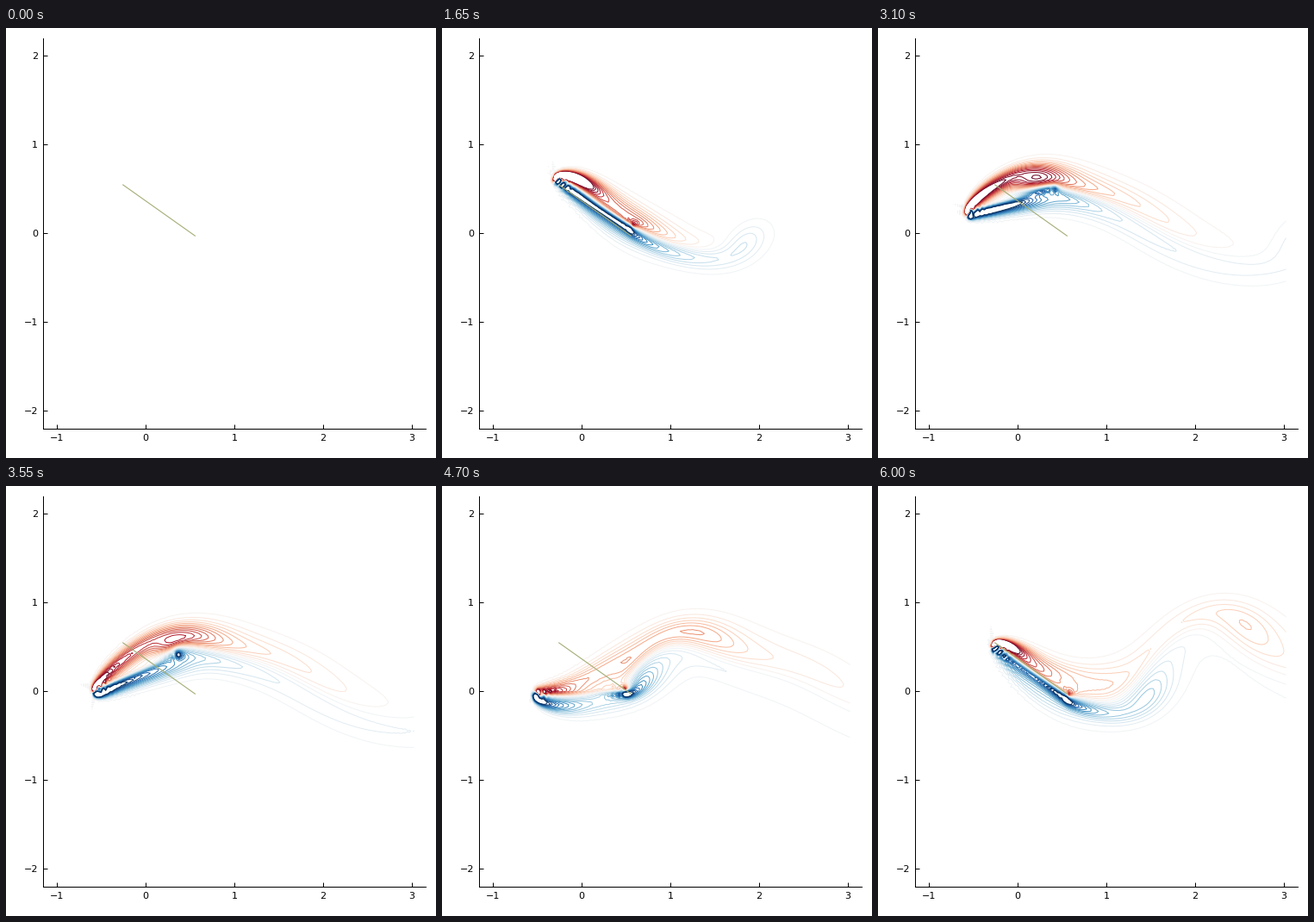
Animation, 499 px wide and 499 px high, one loop 6050 ms. Source, as a matplotlib script:

```python
"""Vorticity contours around a pitching and heaving plate in a free stream."""
import numpy as np
import matplotlib.pyplot as plt
from matplotlib.animation import FuncAnimation

# timing
FRAMES, INTERVAL = 121, 50
STEPS = 9
DT = 0.05 / STEPS

# flow and grid
RE = 200
H = 0.025
NX, NY = 256, 192
X0, Y0 = -1.2, -2.15
SPEED_CAP = 2.4
x = X0 + H * np.arange(NX)
y = Y0 + H * np.arange(NY)

# spectral operators
kx = 2 * np.pi * np.fft.rfftfreq(NX, H)
ky = 2 * np.pi * np.fft.fftfreq(NY, H)
KX, KY = np.meshgrid(kx, ky)
K2 = KX**2 + KY**2
keep = K2 < (0.995 * np.pi / H) ** 2
inv_k2 = np.where(keep, 1 / np.where(K2 > 0, K2, np.inf), 0)
decay = np.exp(-K2 * DT / RE) * keep
blur = np.exp(-0.5 * K2 * 0.02**2) * keep
weight = np.where(kx > 0, 2.0, 1.0)

# plate
OMEGA = 4 / 3
s = np.linspace(-0.49, 0.49, 32)


def pose(t):
    angle = np.radians(-5 - 30 * np.cos(OMEGA * (t - 1.33)))
    cx = -0.26 * np.sin(angle)
    cy = -0.02 - 0.25 * np.cos(OMEGA * t) + 0.25 * np.cos(angle)
    return cx, cy, angle


def plate(t):
    cx, cy, a = pose(t)
    return np.array([cx + s * np.cos(a), cy + s * np.sin(a)])


def plate_velocity(t, e=1e-4):
    return (plate(t + e) - plate(t - e)) / (2 * e)


def response(k_sq):
    """Inverse of the plate's force-to-velocity matrix for one direction."""
    line = (blur**2 * k_sq * inv_k2).sum(axis=0) * weight
    m = np.cos((s[:, None] - s)[..., None] * kx) @ line
    return np.linalg.inv(m + 5e-3 * m[0, 0] * np.eye(len(s)))


along, across = response(KY**2), response(KX**2)


def to_grid(f):
    return np.fft.irfft2(f, s=(NY, NX), norm="forward")


def to_modes(f):
    return np.fft.rfft2(f, norm="forward")


def velocity(wh):
    psi = wh * inv_k2
    return 1j * KY * psi, -1j * KX * psi


def upwind(w, vel, axis):
    """Third-order upwind advection along one axis."""
    a, b = np.roll(w, 1, axis), np.roll(w, -1, axis)
    c, d = np.roll(w, 2, axis), np.roll(w, -2, axis)
    slope = 8 * (b - a) - d + c
    rough = c + d - 4 * (a + b) + 6 * w
    return (vel * slope + np.abs(vel) * rough) / (12 * H)


def advection(wh):
    uh, vh = velocity(wh)
    w = to_grid(wh)
    u = np.clip(1 + to_grid(uh), -SPEED_CAP, SPEED_CAP)
    v = np.clip(to_grid(vh), -SPEED_CAP, SPEED_CAP)
    return -to_modes(upwind(w, u, 1) + upwind(w, v, 0)) * keep


def no_slip(wh, t):
    """Add the vorticity that makes the fluid follow the plate."""
    px, py = plate(t)
    ex = np.exp(1j * np.outer(px - X0, kx))
    ey = np.exp(1j * np.outer(py - Y0, ky))

    def probe(f):
        return (((ey @ (f * blur)) * ex) @ weight).real

    def spread(q):
        return (ey.conj() * q[:, None]).T @ ex.conj()

    uh, vh = velocity(wh)
    pu, pv = plate_velocity(t)
    du, dv = pu - 1 - probe(uh), pv - probe(vh)
    angle = pose(t)[2]
    c, sn = np.cos(angle), np.sin(angle)
    ft = along @ (c * du + sn * dv)
    fn = across @ (c * dv - sn * du)
    fx, fy = c * ft - sn * fn, sn * ft + c * fn
    return wh + 1j * blur * (KX * spread(fy) - KY * spread(fx))


# part of the grid that is drawn
cols = slice(np.searchsorted(x, -0.9), np.searchsorted(x, 3.04))
rows = slice(np.searchsorted(y, -1.2), np.searchsorted(y, 1.5))


def simulate():
    ramp = np.clip((x - 4.2) / 0.5, 0, 1)
    fade = 1 - 0.4 * ramp**2 * (3 - 2 * ramp)
    wh = np.zeros(K2.shape, complex)
    old = np.zeros_like(wh)
    fields = [np.zeros((NY, NX))[rows, cols]]
    for n in range(1, FRAMES):
        for m in range(1, STEPS + 1):
            new = advection(wh)
            wh = decay * (wh + DT * (1.5 * new - 0.5 * decay * old))
            wh = no_slip(wh, ((n - 1) * STEPS + m) * DT)
            old = new
        w = to_grid(wh)
        fields.append(w[rows, cols].copy())
        wh = to_modes(w * fade)
    return fields


fields = simulate()

# stage
SIZE, DPI, UNIT = 499, 100, 103
LEFT, RIGHT, TOP, BOTTOM = 43, 487, 12, 465
OX, OY = 162, 238.1
plt.rcParams.update({"font.family": "DejaVu Sans", "font.size": 8})
fig = plt.figure(figsize=(SIZE / DPI, SIZE / DPI), dpi=DPI, facecolor="white")
ax = fig.add_axes([LEFT / SIZE, 1 - BOTTOM / SIZE,
                   (RIGHT - LEFT) / SIZE, (BOTTOM - TOP) / SIZE])
ax.set_xlim((LEFT - OX) / UNIT, (RIGHT - OX) / UNIT)
ax.set_ylim((OY - BOTTOM) / UNIT, (OY - TOP) / UNIT)
ax.set_xticks(range(-1, 4))
ax.set_yticks(range(-2, 3))
ax.tick_params(direction="in", length=3.6, width=0.72, pad=4.4)
for side, spine in ax.spines.items():
    spine.set_visible(side in ("left", "bottom"))
    spine.set_linewidth(0.72)
ax.plot([-0.255, 0.557], [0.545, -0.03], color="#a3ae76", lw=0.8, zorder=3)

PEAK = 10
levels = np.linspace(-PEAK, PEAK, 30)
shown = []


def draw(n):
    while shown:
        shown.pop().remove()
    if n:
        shown.append(ax.contour(x[cols], y[rows], fields[n], levels=levels,
                                cmap="RdBu", vmin=-PEAK, vmax=PEAK,
                                linewidths=0.72, zorder=2))
    return shown


anim = FuncAnimation(fig, draw, frames=FRAMES, interval=INTERVAL,
                     repeat=True, repeat_delay=0, blit=False)
plt.show()
```
